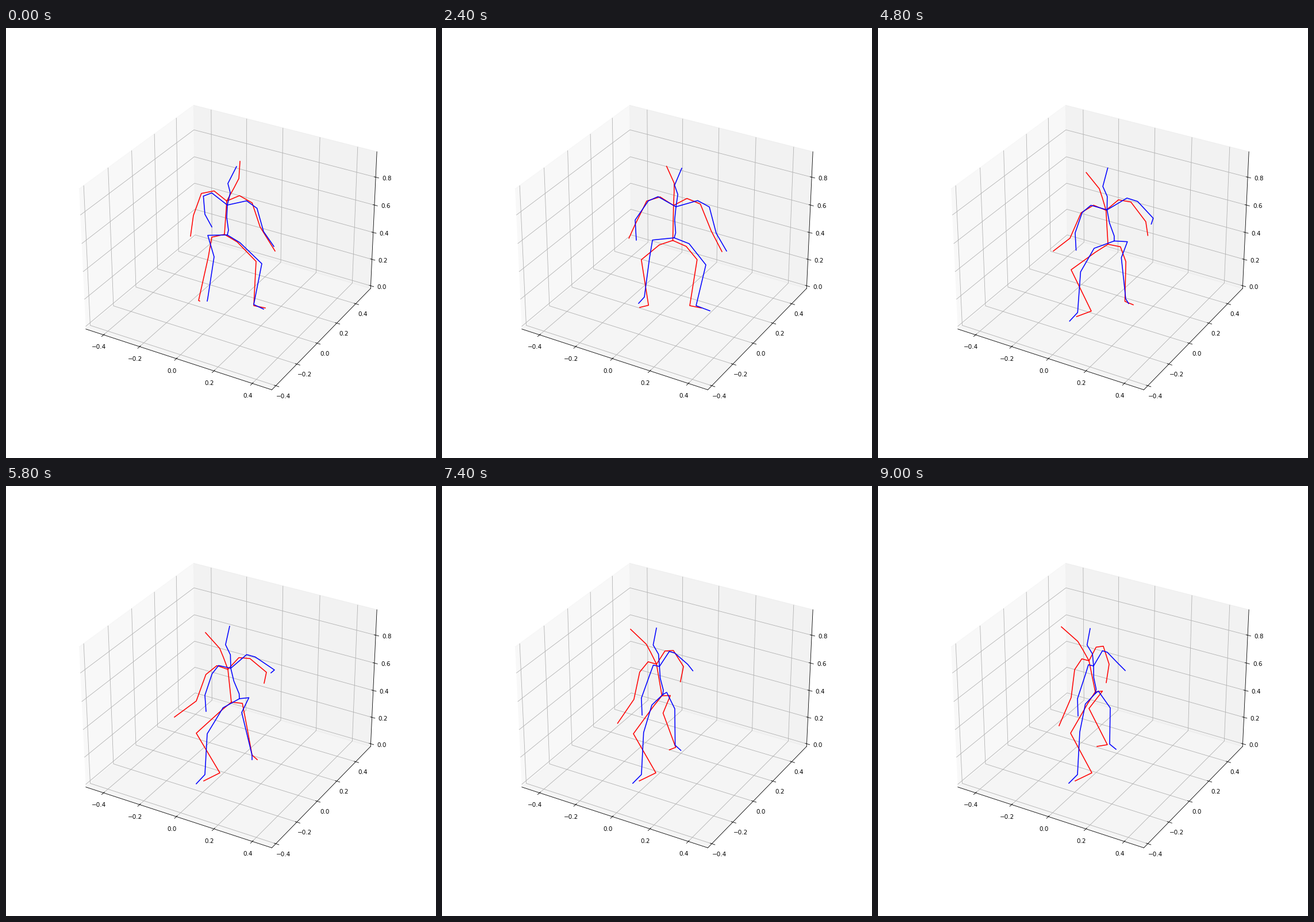
Animation of 748x748 px, one loop 9.2 s. Source, as a matplotlib script:

```python
import numpy as np
import matplotlib.pyplot as plt
from matplotlib.animation import FuncAnimation
from matplotlib.ticker import MultipleLocator

SIZE, INCHES = 748, 10
FRAMES, STEP = 46, 200


def smooth(t):
    t = np.clip(t, 0, 1)
    return t * t * (3 - 2 * t)


def lerp(a, b, t):
    return a + (b - a) * t


class Path:
    """Curve through a few timed points; a planted one rests at each point."""

    def __init__(self, times, points, planted):
        self.times = np.array(times)
        self.pos = np.array(points, float)
        self.vel = np.gradient(self.pos, self.times, axis=0) * (not planted)

    def at(self, frame):
        frame = min(frame, self.times[-1])
        k = min(np.searchsorted(self.times, frame, "right"), len(self.times) - 1) - 1
        span = self.times[k + 1] - self.times[k]
        t = (frame - self.times[k]) / span
        return (lerp(self.pos[k], self.pos[k + 1], smooth(t))
                + span * t * (1 - t) ** 2 * self.vel[k]
                - span * t * t * (1 - t) * self.vel[k + 1])


class Figure:
    """A stick figure whose shoulders and hips turn about the spine."""

    def __init__(self, ax, color, times, turn, window, radius, shoulder_mid,
                 hip_mid, hip_scale, collar, back, neck, joints):
        self.turn, self.window = np.radians(turn), window
        self.radius = np.array(radius)
        self.shoulder_mid, self.hip_mid = np.array(shoulder_mid), np.array(hip_mid)
        self.hip_scale, self.collar = hip_scale, collar
        self.back, self.neck = back, neck
        self.paths = {name: Path(times, pts, name.startswith(("ankle", "toe")))
                      for name, pts in joints.items()}
        self.lines = [ax.plot([], [], color=color, lw=1.5)[0] for _ in range(5)]

    def half_width(self, frame):
        start, end = self.window
        angle = lerp(*self.turn, smooth((frame - start) / (end - start)))
        return self.radius * [np.cos(angle), np.sin(angle)]

    def chains(self, frame):
        joint = {name: path.at(frame) for name, path in self.paths.items()}
        pelvis, chest, head = joint["pelvis"], joint["chest"], joint["head"]
        half = self.half_width(frame)

        # Inner spine joints: a share of the way plus a sideways bend.
        back = [lerp(pelvis, chest, t) + [bend, 0] for t, bend in self.back]
        neck = [lerp(chest, head, t) + [bend, 0] for t, bend in self.neck]
        yield [pelvis, *back, chest, *neck, head]

        for side, sign in (("l", -1), ("r", 1)):
            reach = self.shoulder_mid + sign * half
            collar = chest + self.collar * reach + [0, -11]
            yield [chest, collar, chest + reach,
                   joint["elbow_" + side], joint["hand_" + side]]
            hip = pelvis + self.hip_mid + sign * self.hip_scale * half
            yield [pelvis, hip, joint["knee_" + side],
                   joint["ankle_" + side], joint["toe_" + side]]

    def pose(self, frame):
        for line, chain in zip(self.lines, self.chains(frame)):
            line.set_data(*np.transpose(chain))
        return self.lines


fig = plt.figure(figsize=(INCHES, INCHES), dpi=SIZE / INCHES)

room = fig.add_subplot(111, projection="3d")
room.set_xlim(-0.5, 0.5)
room.set_ylim(-0.437, 0.563)
room.set_zlim(-0.02, 0.98)
for axis in (room.xaxis, room.yaxis, room.zaxis):
    axis.set_major_locator(MultipleLocator(0.2))

# Flat layer in stage pixels, y pointing down.
stage = fig.add_axes([0, 0, 1, 1])
stage.set_axis_off()
stage.set_xlim(0, SIZE)
stage.set_ylim(SIZE, 0)

red = Figure(
    stage, "red", times=(0, 19, 29, 41), turn=(20, -58), window=(0, 45),
    radius=(47, 24), shoulder_mid=(0, -5), hip_mid=(0, 9), hip_scale=0.5,
    collar=0.5, back=[(0.42, 0)], neck=[(0.33, 5), (0.57, 8)],
    joints=dict(
        pelvis=[(380, 359), (406, 374), (392, 376), (378, 358)],
        chest=[(384, 301), (405, 313), (386, 319), (367, 304)],
        head=[(407, 232), (377, 246), (347, 255), (319, 245)],
        elbow_l=[(326, 326), (337, 355), (331, 374), (336, 368)],
        hand_l=[(321, 362), (320, 374), (293, 402), (315, 417)],
        elbow_r=[(442, 346), (473, 349), (453, 324), (402, 310)],
        hand_r=[(468, 388), (485, 380), (449, 343), (397, 342)],
        knee_l=[(352, 398), (342, 410), (331, 430), (335, 430)],
        ankle_l=[(335, 474), (370, 486), (372, 499), (372, 499)],
        toe_l=[(337, 475), (347, 491), (344, 513), (343, 513)],
        knee_r=[(435, 406), (441, 403), (417, 408), (367, 387)],
        ankle_r=[(431, 483), (431, 483), (428, 468), (399, 450)],
        toe_r=[(451, 487), (451, 487), (437, 476), (381, 453)],
    ))

blue = Figure(
    stage, "blue", times=(0, 12, 29, 39), turn=(32, -70), window=(2, 41),
    radius=(55, 20), shoulder_mid=(5, -5), hip_mid=(-6, 7), hip_scale=0.6,
    collar=0.65, back=[(0.16, 2), (0.58, -1)], neck=[(0.32, 0), (0.56, -8)],
    joints=dict(
        pelvis=[(385, 360), (404, 365), (406, 370), (378, 361)],
        chest=[(385, 308), (407, 311), (391, 317), (375, 313)],
        head=[(401, 241), (417, 244), (389, 244), (369, 248)],
        elbow_l=[(346, 324), (336, 334), (346, 364), (347, 370)],
        hand_l=[(358, 346), (338, 369), (348, 392), (348, 400)],
        elbow_r=[(448, 354), (477, 357), (467, 320), (417, 308)],
        hand_r=[(466, 380), (495, 388), (461, 325), (430, 321)],
        knee_l=[(362, 398), (361, 400), (350, 431), (351, 428)],
        ankle_l=[(351, 470), (352, 468), (346, 502), (347, 502)],
        toe_l=[(350, 475), (342, 479), (331, 518), (332, 517)],
        knee_r=[(445, 410), (459, 412), (410, 394), (404, 386)],
        ankle_r=[(431, 481), (442, 483), (428, 468), (403, 449)],
        toe_r=[(448, 489), (466, 492), (428, 476), (414, 458)],
    ))


def update(frame):
    return red.pose(frame) + blue.pose(frame)


anim = FuncAnimation(fig, update, frames=FRAMES, interval=STEP,
                     repeat=True, repeat_delay=0, blit=False)
plt.show()
```
